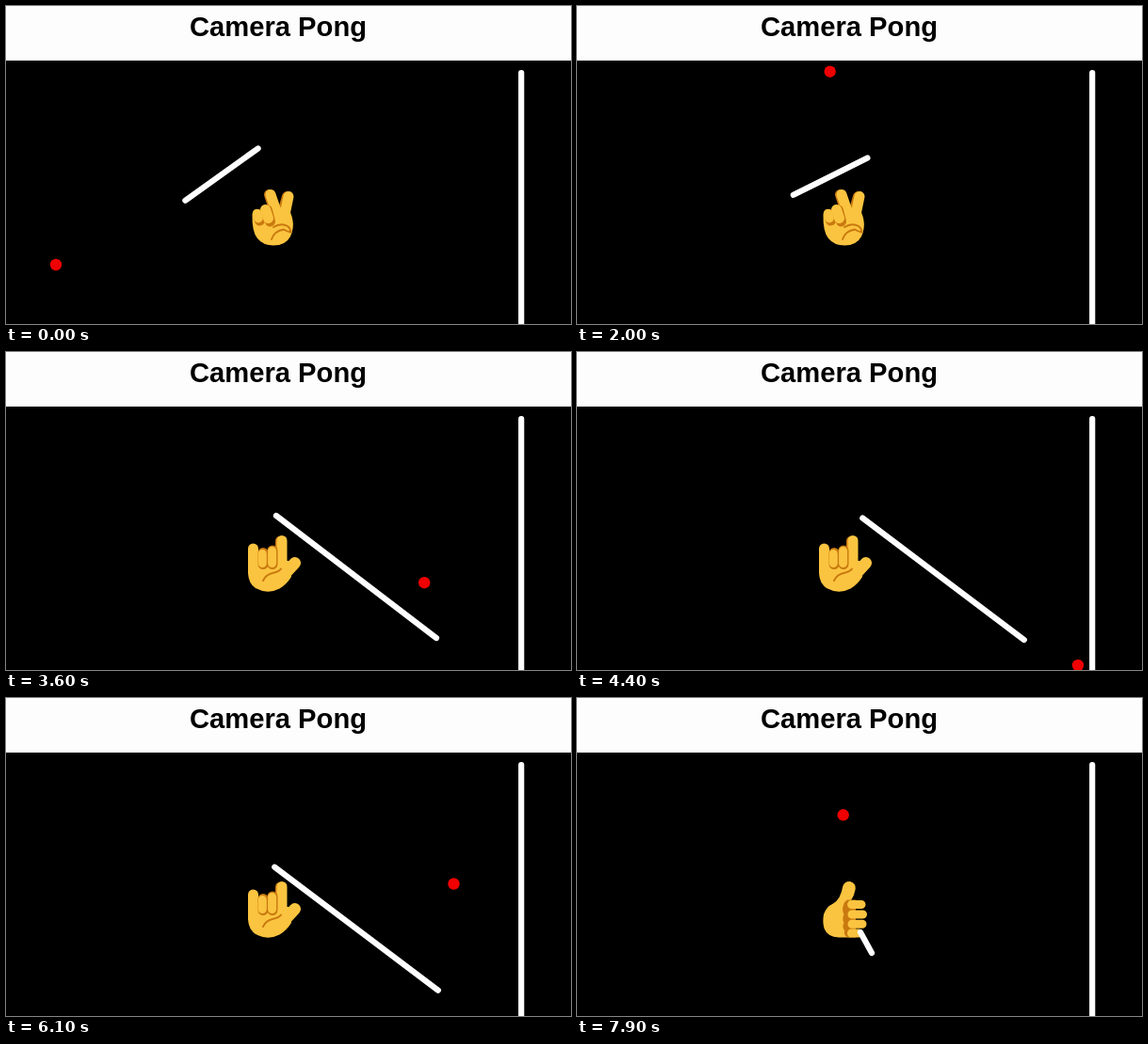
Animation of 600 by 338 pixels, one loop 8 s. Source, as an HTML page:

```html
<!DOCTYPE html>
<html lang="en">
<head>
<meta charset="utf-8">
<title>Camera Pong</title>
<style>
  html, body { margin: 0; width: 100%; height: 100%; overflow: hidden; background: #000; }
  svg { display: block; width: 600px; height: 338px; }
  text { font: bold 29.2px "Liberation Sans", Arial, sans-serif; }
  .bar { stroke: #fff; stroke-width: 6.2; stroke-linecap: round; }
  .hand { visibility: hidden; fill: #fbc440; stroke-linecap: round; stroke-linejoin: round; }
  .dark { fill: #c9790f; }
  .finger { fill: none; stroke: #fbc440; stroke-width: 11; }
  .thin { stroke-width: 9; }
  .shade { fill: none; stroke: #c9790f; stroke-width: 11; }
  .crease { fill: none; stroke: #c9790f; stroke-width: 2; }
</style>
</head>
<body>
<svg viewBox="0 0 600 338">
  <rect width="600" height="338"/>
  <rect width="600" height="58" fill="#fefdfe"/>
  <text x="289" y="32.3" text-anchor="middle">Camera Pong</text>

  <g class="hand" id="victory">
    <path class="shade" d="M279.5 200.500L286 220M298.500 202.500L293 222"/>
    <path class="finger" d="M281 200.500L287 218M300 202.500L296 222"/>
    <path d="M261.500 221Q261 240 267 247Q273 254.500 284 254.500Q297 254.500 302 245Q306 236 304.500 228Q303 219 299 215L284 214Z"/>
    <path class="shade" d="M268 221.500L269.500 228M277.500 217L280.500 229"/>
    <path class="finger" style="stroke-width:9.500" d="M266.500 220.500L268 225.500"/>
    <path class="finger" d="M275.500 216.500L278.500 225.500"/>
    <path class="crease" d="M284 235Q292 230 299 234Q302 236 302.500 240.500Q299 240 295 237.500Q285 239 282 248"/>
  </g>

  <g class="hand" id="horns">
    <path class="finger" d="M262.500 209V230"/>
    <path class="shade" d="M291.500 201V226"/>
    <path class="finger" d="M293 200.500V228"/>
    <path class="finger" style="stroke-width:12.500" d="M306.800 224.300L295 237"/>
    <path d="M257 222V235Q257.500 246 265 251Q278 258 290.500 251.500Q298 247 303 239L300 222Z"/>
    <path class="shade" d="M273 213.500V225.500M283 211V225.500"/>
    <path class="finger thin" d="M272.300 214.500V224.500M282.600 211.500V224.500"/>
    <path class="crease" d="M273 243Q276 236.500 283 235Q290 233.500 292 230.500"/>
  </g>

  <g class="hand" id="thumb">
    <path d="M282.300 200Q284.500 194.500 290 195Q296.500 197 295.700 203Q294.500 210 291 215L288 250L291 254.500H278Q266 254 262.500 245Q260.500 238 262 230Q264.500 222 272 218.500Q280 214 282.300 200Z"/>
    <path class="dark" d="M287 214.500H296V254.500H288Q283 253 284 247Q281 243 283.500 239Q281 234 283.500 230Q281 225 283 220Q284 216 287 214.500Z"/>
    <path class="finger thin" d="M291.600 219.500H302M292 230H303.500M292 240.300H303M291.500 250H299"/>
  </g>

  <line class="bar" id="paddle"/>
  <circle id="ball" r="6.200" fill="#f00000"/>
  <line class="bar" x1="547.200" y1="71" x2="547.200" y2="350"/>
</svg>
<script>
const LOOP = 8000, STEP = 100;
const START = { x: 53, y: 275 };
const TOP = 64.5, BOTTOM = 358, WALL = 541, HIT = 485.5;

// distance covered by the ball along each axis
const travel = [
  { at: 0, d: 0 }, { at: 900, d: 95 }, { at: 4400, d: 479 },
  { at: 6100, d: 664.5 }, { at: 8000, d: 868 }
];

// left end, vector to the right end, and sideways sway until the next pose
const poses = [
  { at: 0, x: 190.4, y: 206.8, dx: 77.2, dy: -55.4, sway: 20 },
  { at: 900, x: 205.4, y: 200.8, dx: 80.2, dy: -60.4, sway: 0 },
  { at: 2000, x: 229.8, y: 200.8, dx: 78.6, dy: -39.4, sway: 0 },
  { at: 2700, x: 262, y: 164, dx: 170, dy: 129, sway: 0 },
  { at: 3600, x: 287, y: 174, dx: 170, dy: 130, sway: -32 },
  { at: 4400, x: 303.3, y: 176.5, dx: 171.5, dy: 129.5, sway: -22 },
  { at: 6100, x: 285.3, y: 179.7, dx: 173.6, dy: 131, sway: -45 },
  { at: 7900, x: 301, y: 249, dx: 12, dy: 22, sway: 0 }
];

const hands = [
  { at: 0, id: "victory" }, { at: 2300, id: "horns" }, { at: 6600, id: "thumb" }
];

const get = id => document.getElementById(id);
const ball = get("ball"), paddle = get("paddle");

function set(el, attrs) {
  for (const name in attrs) el.setAttribute(name, attrs[name]);
}

function sample(keys, t) {
  const a = keys.filter(key => key.at <= t).pop();
  const b = keys[keys.indexOf(a) + 1] || a;
  const k = a === b ? 0 : (t - a.at) / (b.at - a.at);
  const out = { k, sway: a.sway };
  for (const name in a) if (name !== "sway") out[name] = a[name] + (b[name] - a[name]) * k;
  return out;
}

// straight run folded back and forth between two edges
function bounce(v, low, high) {
  const size = high - low, p = Math.abs(v - low) % (2 * size);
  return low + Math.min(p, 2 * size - p);
}

function ballAt(t) {
  const { d } = sample(travel, t);
  let run = START.x + d;
  // the paddle sends the ball back to the wall once
  if (run > 2 * WALL - HIT) run -= 2 * (WALL - HIT);
  return { cx: WALL - Math.abs(WALL - run), cy: bounce(START.y - d, TOP, BOTTOM) };
}

function paddleAt(t) {
  const p = sample(poses, t);
  const x = p.x + p.sway * Math.sin(Math.PI * p.k);
  return { x1: x, y1: p.y, x2: x + p.dx, y2: p.y + p.dy };
}

function draw(now) {
  const t = Math.floor(now % LOOP / STEP) * STEP;
  set(ball, ballAt(t));
  set(paddle, paddleAt(t));
  const shown = hands.filter(hand => hand.at <= t).pop();
  for (const hand of hands) get(hand.id).style.visibility = hand === shown ? "visible" : "hidden";
}

const start = performance.now();
function tick() {
  draw(performance.now() - start);
  requestAnimationFrame(tick);
}
tick();
</script>
</body>
</html>
```
